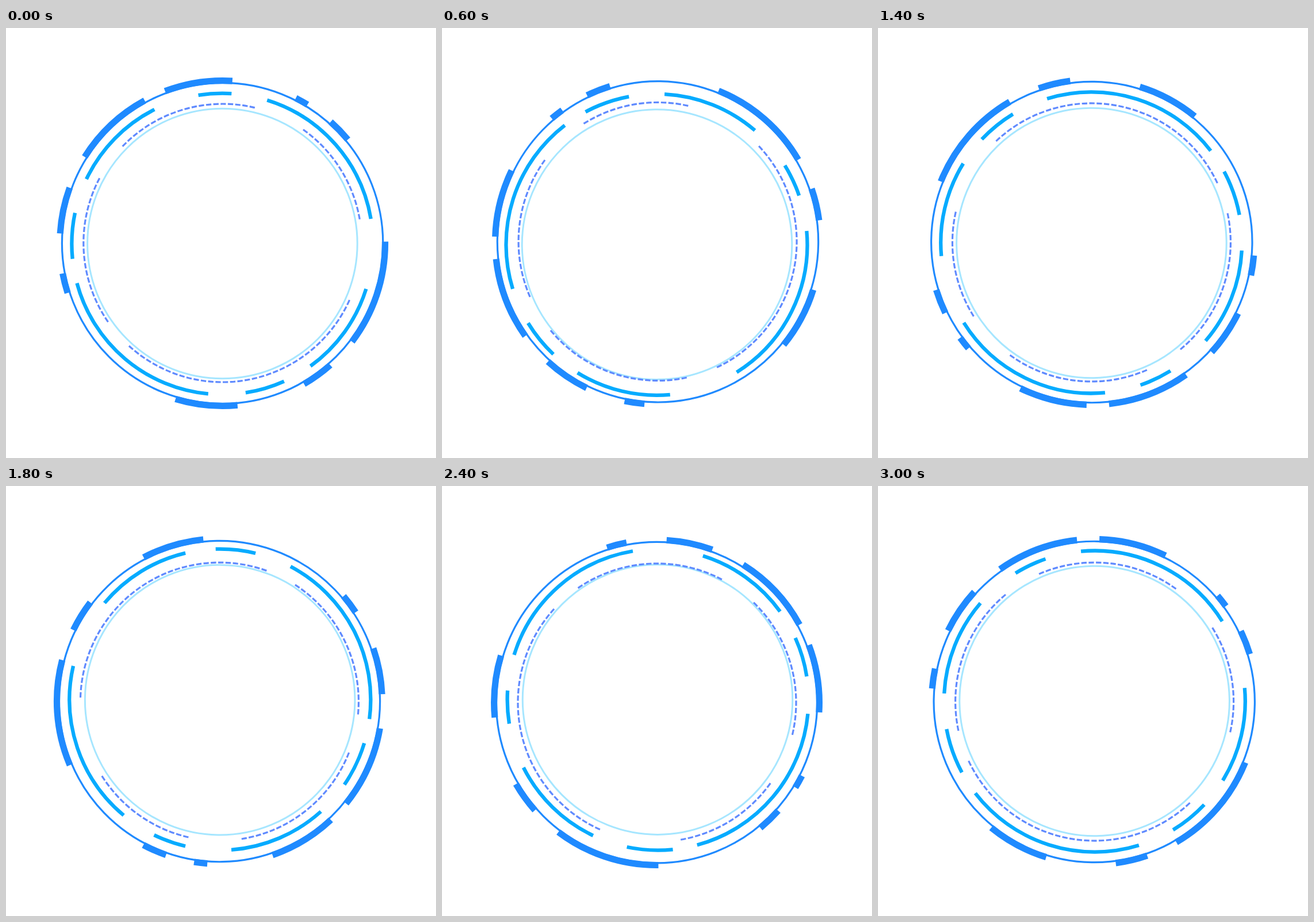
Recreate the animation shown at these times as an HTML page. Size 748x748 px, loop 3.1 s.

```html
<!DOCTYPE html>
<html lang="en">
<head>
<meta charset="utf-8">
<title>Rotating rings</title>
<style>
  html, body { margin: 0; height: 100%; overflow: hidden; background: #fff; }
  svg { display: block; width: 100vw; height: 100vh; }
</style>
</head>
<body>
<svg viewBox="0 0 748 748" fill="none"></svg>
<script>
const svg = document.querySelector("svg");
const PIVOT = 374, LOOP = 3100, TICK = 100, STEP = 11.25;

// Fill an arc with equal dashes so that it begins and ends on a whole dash.
function dashed(span, period = 3.03, fill = 0.73) {
  const count = Math.round(span / period + 1 - fill);
  const step = span / (count - 1 + fill);
  const dash = step * fill, gap = step - dash;
  return [...Array(count - 1).fill([dash, gap]).flat(), dash];
}

// Each ring sits slightly off the pivot (dx, dy), so it wobbles as it turns.
// Arcs alternate drawn and empty degrees, clockwise from the start angle.
const rings = [
  { dir: 1, dx: 2.4, dy: 1, r: 234.8, width: 3, color: "#a6e6ff" },
  { dir: -1, dx: 2.8, dy: 0, r: 242, width: 3.2, color: "#5f8aff", start: 24.2,
    arcs: [108.1, 13.1, 62.4, 16.2, 59.4, 22, 44.8, 34]
      .flatMap((span, i) => i % 2 ? span : dashed(span)) },
  { dir: 1, dx: 2.4, dy: 1.6, r: 262, width: 6.3, color: "#05abff", start: 17.4,
    arcs: [36.8, 11.6, 15.3, 14.3, 69.5, 9.4, 17.6, 13.6, 37.7, 17.6, 12.7, 13.8, 63.1, 27] },
  { dir: -1, dx: 2.6, dy: 0.5, r: 279.2, width: 3.2, color: "#1f8aff" },
  { dir: -1, dx: 2.6, dy: 0.5, r: 282.9, width: 11.2, color: "#1f8aff", start: -0.6,
    arcs: [37.8, 11.3, 11.4, 24.8, 22.1, 55.4, 7.1, 14.2, 16.5, 12.1,
      29.3, 7.9, 24.2, 23.3, 4.7, 10.2, 8.7, 39] }
];

for (const ring of rings) {
  const { dx, dy, r, width, color, start = 0, arcs = [] } = ring;
  const attributes = {
    cx: PIVOT + dx, cy: PIVOT + dy, r, pathLength: 360,
    stroke: color, "stroke-width": width,
    "stroke-dasharray": arcs.join(" ") || "none", "stroke-dashoffset": -start
  };
  ring.circle = document.createElementNS(svg.namespaceURI, "circle");
  for (const name in attributes) ring.circle.setAttribute(name, attributes[name]);
  svg.append(ring.circle);
}

let origin;
function draw(now) {
  origin ??= now;
  const angle = STEP * Math.floor(((now - origin) % LOOP) / TICK);
  for (const { circle, dir } of rings)
    circle.setAttribute("transform", `rotate(${dir * angle} ${PIVOT} ${PIVOT})`);
  requestAnimationFrame(draw);
}
requestAnimationFrame(draw);
</script>
</body>
</html>
```
